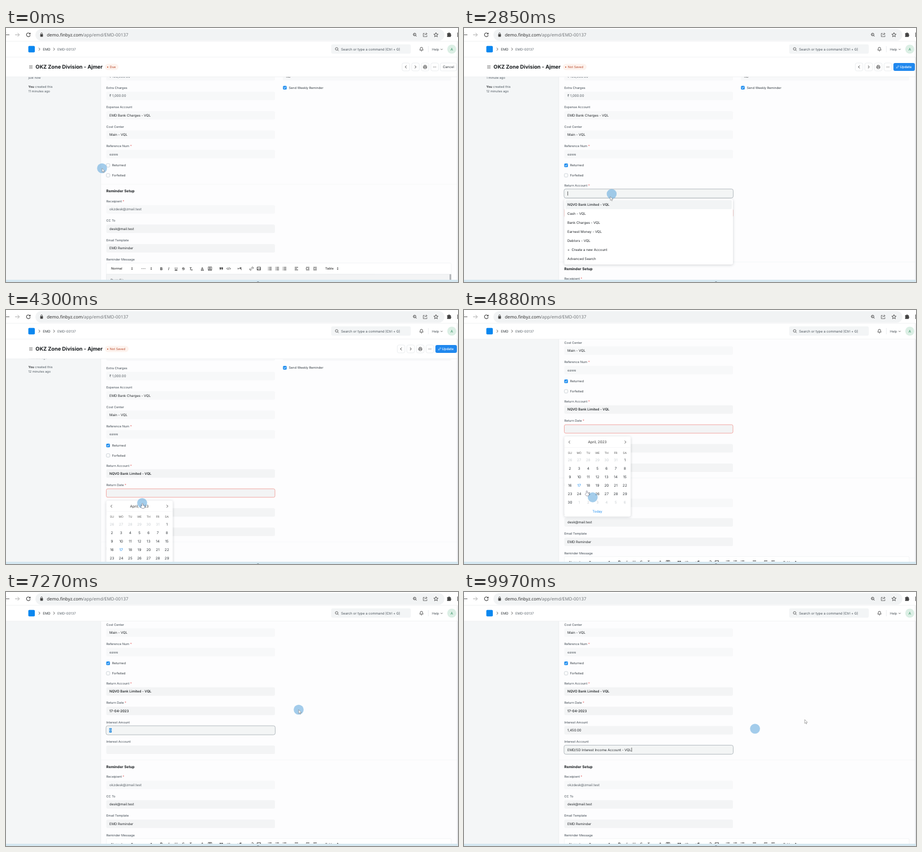
An HTML page with a canvas that plays this animation: 800x450 px, repeating every 10 s.

```html
<!DOCTYPE html>
<html lang="en">
<head>
<meta charset="utf-8">
<title>Deposit form</title>
<style>
html, body { margin: 0; width: 100%; height: 100%; overflow: hidden; background: #fff; }
canvas { display: block; width: 800px; height: 450px; }
</style>
</head>
<body>
<canvas id="stage"></canvas>
<script>
const LOOP = 10000, SANS = 'Inter, sans-serif';
const canvas = document.getElementById('stage'), c = canvas.getContext('2d');
const ratio = window.devicePixelRatio || 1;
canvas.width = 800 * ratio;
canvas.height = 450 * ratio;
// Unhinted advances keep small text at its true width
c.textRendering = 'geometricPrecision';

// Pointer path: time, x, y
const path = [
  [0, 170, 248.5], [700, 181, 244], [1250, 181, 244], [1790, 240, 229.3], [1850, 256, 246],
  [2200, 262, 293], [2750, 262, 293], [3050, 250, 314], [3270, 250, 314], [3600, 213, 330],
  [3850, 213, 330], [4240, 241, 342], [4300, 241, 344], [4700, 241, 344], [5000, 204, 310],
  [5230, 204, 310], [5550, 465, 261.5], [5610, 475, 259], [6400, 420, 246], [6750, 400, 246],
  [7180, 518, 208.5], [8500, 518, 208.5], [8780, 380, 279], [9150, 380, 279], [9450, 350, 299],
  [9690, 350, 299], [9910, 515, 242.3], [9970, 603, 226], [LOOP, 603, 226]
];
const HALO_LAG = 60;
const between = (t, a, b) => t >= a && t < b;
const ease = (t, a, b) => {
  const u = Math.min(1, Math.max(0, (t - a) / (b - a)));
  return u * u * (3 - 2 * u);
};

function pointerAt(t) {
  const i = Math.max(1, path.findIndex(p => p[0] >= t));
  const [t0, x0, y0] = path[i - 1], [t1, x1, y1] = path[i], u = ease(t, t0, t1);
  return [x0 + (x1 - x0) * u, y0 + (y1 - y0) * u];
}

// Drawing helpers; text is placed by its vertical centre
function text(s, x, y, size = 6.04, color = '#262a2e', weight = 400, align = 'left', family = SANS) {
  c.font = `${weight} ${size}px ${family}`;
  c.fillStyle = color;
  c.textAlign = align;
  c.fillText(s, x, y + size * 0.36);
  return c.measureText(s).width;
}
function box(x, y, w, h, r, fill, line, lineWidth = 0.7) {
  c.beginPath();
  c.roundRect(x, y, w, h, r);
  if (fill) { c.fillStyle = fill; c.fill(); }
  if (line) { c.strokeStyle = line; c.lineWidth = lineWidth; c.stroke(); }
}
function disc(x, y, r, fill) {
  box(x - r, y - r, 2 * r, 2 * r, r, fill);
}
function icon(d, x, y, color = '#444', width = 0.9, fill) {
  const p = new Path2D(d);
  c.save();
  c.translate(x, y);
  if (fill) { c.fillStyle = fill; c.fill(p); }
  c.strokeStyle = color;
  c.lineWidth = width;
  c.stroke(p);
  c.restore();
}
function panel(x, y, w, h) {
  c.save();
  c.shadowColor = 'rgba(30,40,50,.2)';
  c.shadowBlur = 5 * ratio;
  c.shadowOffsetY = ratio;
  box(x, y, w, h, 3, '#fff');
  c.restore();
}
const RIGHT = 'M-1.2 -2.3L1.2 0L-1.2 2.3', LEFT = 'M1.2 -2.3L-1.2 0L1.2 2.3', DOWN = 'M-1.7 -.8L0 .9L1.7 -.8';
const UPDOWN = 'M-1.2 -.8L0 -2.2L1.2 -.8ZM-1.2 .8L0 2.2L1.2 .8Z';
const LENS = 'M2 -.5A2.3 2.3 0 1 1 -2.6 -.5A2.3 2.3 0 1 1 2 -.5M1.4 1.2L3.2 3';
const LINES = 'M-3 -2.2H3M-3 0H3M-3 2.2H3';

function label(s, y, required) {
  const w = text(s, 177.5, y, 5.55, '#414b54');
  if (required) text('*', 179 + w, y, 5.55, '#e24c4c');
}
function field(y, value, o = {}) {
  const { x = 177.5, w = 298.5, focus, invalid, readOnly, bold, color } = o;
  if (focus) box(x - 0.5, y - 8, w + 1, 16, 3.2, '#f3f5f5', '#b4bbc0', 1);
  else box(x, y - 7.5, w, 15, 2.5, readOnly ? '#f7f8f9' : '#f3f4f5', invalid && '#f0958e', 0.8);
  const ink = color || (bold ? '#15191c' : '#262a2e');
  const width = text(value, x + 5.5, y, 6.04, ink, bold ? 500 : 400);
  if (focus && !o.selected) box(x + 5.9 + width, y - 3.6, 0.7, 7.2, 0, '#222');
}
function check(x, y, on, s) {
  if (on) {
    box(x - 3.3, y - 3.3, 6.6, 6.6, 1.6, '#2490ef');
    icon('M-1.7 0L-.5 1.3L1.8 -1.3', x, y, '#fff', 1);
  } else box(x - 3, y - 3, 6, 6, 1.5, '#fff', '#b8c0c7', 0.7);
  text(s, x + 7, y, 5.6, '#363e45');
}
function suggestions(y, items) {
  panel(177.5, y, 298.5, items.length * 16 + 4);
  items.forEach((s, i) => {
    if (!i) box(179.5, y + 2, 294.5, 16, 2, '#f2f4f5');
    text(s, 183, y + 10 + i * 16, 6.04, '#262a2e', i ? 400 : 500);
  });
}

function calendar(y) {
  panel(177.5, y, 117.5, 142);
  icon(LEFT, 186.5, y + 10);
  icon(RIGHT, 285.5, y + 10);
  text('April, 2023', 236, y + 10, 6.3, '#333', 400, 'center');
  box(178, y + 19, 116.5, 0.6, 0, '#edf0f2');
  ['SU', 'MO', 'TU', 'WE', 'TH', 'FR', 'SA'].forEach((s, i) =>
    text(s, 187.5 + i * 16.2, y + 29, 5, '#555', 400, 'center'));
  for (let i = 0; i < 42; i++) {
    const day = i < 6 ? i + 26 : i > 35 ? i - 35 : i - 5, other = i < 6 || i > 35, today = i === 22;
    text(day, 187.5 + i % 7 * 16.2, y + 42 + Math.floor(i / 7) * 15, 6.3,
      other ? '#c8cdd1' : today ? '#2490ef' : '#30363b', today ? 500 : 400, 'center');
  }
  text('Today', 236, y + 133, 6, '#2490ef', 400, 'center');
}

function editor(y) {
  box(177.5, y - 10, 610.5, 20, 2, '#fff', '#eceff1');
  box(177.5, y + 10, 610.5, 90, 0, '#f3f4f5', '#e6e9eb');
  box(785, y + 10, 3, 40, 0, '#b5b8bb');
  text('Dear Sir,', 185, y + 20.5);
  text('Normal', 186, y, 5.7, '#333', 500);
  text('---', 239, y, 6, '#333', 500);
  text('Table', 565, y, 5.7, '#333', 500);
  [223, 257, 587].forEach(x => icon(UPDOWN, x, y, '#333', 0.2, '#333'));
  const glyph = (s, x, style = 500) => text(s, x, y, 6.8, '#333', style, 'center');
  glyph('B', 275, 700);
  glyph('I', 288, 'italic 500');
  glyph('U', 301);
  glyph('S', 314);
  glyph('T', 326.5, 'italic 500');
  glyph('A', 347.5);
  glyph('A', 361);
  glyph('¶', 415);
  icon('M-2.8 -2H-.5V.3L-1.7 2.2H-2.4L-1.9 .3H-2.8ZM.5 -2H2.8V.3L1.6 2.2H.9L1.4 .3H.5Z', 381, y, '#333', 0.2, '#333');
  icon('M-1 -1.3L.8 0L-1 1.3Z', 411.5, y, '#333', 0.2, '#333');
  icon('M298.5 3.2H303.5M311.5 0H316.5M327.5 1L330 3.4M330 1L327.5 3.4M345 3.2H350M358 -3H364V3H358Z' +
    'M392.6 -1.7L390.6 0L392.6 1.7M395.6 -1.7L397.6 0L395.6 1.7M394.7 -2L393.5 2', 0, y, '#333', 0.8);
  icon('M-.8 .8L.8 -.8M0 -1.6L1 -2.6A1.5 1.5 0 0 1 3 -.6L1.8 .6M0 1.6L-1 2.6A1.5 1.5 0 0 1 -3 .6L-1.8 -.6', 434.5, y, '#333', 0.9);
  icon('M-3 -2.6H3V2.6H-3ZM-2.8 2L-.8 0L.5 1L1.6 -.2L3 1.6', 447.5, y, '#333', 0.9);
  [467, 480, 493, 514, 534, 547].forEach((x, i) => {
    icon(i < 3 ? 'M-1.4 -2.3H3.2M-1.4 0H3.2M-1.4 2.3H3.2' : i < 4 ? 'M-3 -2.3H3M-3 0H1M-3 2.3H3' : 'M-3 -2.3H3M0 0H3M-3 2.3H3', x, y, '#333', 0.9);
    if (i < 3) icon('M-3.3 -2.3H-2.3M-3.3 0H-2.3M-3.3 2.3H-2.3', x, y, '#333', 0.9);
  });
  icon('M-3 -1L-1.6 0L-3 1Z', 534, y, '#333', 0.3, '#333');
  icon('M-1.6 -1L-3 0L-1.6 1Z', 547, y, '#333', 0.3, '#333');
}

function page(t) {
  const open = t >= 1210, grow = open ? 137.5 : 0;
  const scroll = 117 * ease(t, 4265, 4620);
  const grey = { readOnly: true, color: '#565e65' }, plain = { readOnly: true };
  c.save();
  c.beginPath();
  c.rect(0, 52, 800, 394);
  c.clip();
  c.fillStyle = '#f4f6f7';
  c.fillRect(0, 52, 168, 394);
  c.fillStyle = '#fdfdfe';
  c.fillRect(168, 52, 631, 394);
  c.fillStyle = '#e9ecee';
  c.fillRect(167.5, 52, 0.7, 394);
  c.translate(0, -scroll);

  text(open ? '1 minute ago' : 'just now', 39.5, 88, 5.6, '#505a62');
  const you = text('You', 39.5, 104, 5.6, '#262a2e', 600);
  text(' created this', 39.5 + you, 104, 5.6, '#505a62');
  text(open ? '12 minutes ago' : '11 minutes ago', 39.5, 112, 5.6, '#505a62');

  field(85.7, '₹ 100,000.00', grey);
  field(85.7, 'No', { ...plain, x: 490, w: 298 });
  check(493.5, 105.7, true, 'Send Weekly Reminder');
  label('Extra Charges', 106);
  field(120.3, '₹ 1,000.00', grey);
  label('Expense Account', 140.5);
  field(154.7, 'EMD Bank Charges - VQL', plain);
  label('Cost Center', 175);
  field(189, 'Main - VQL', plain);
  label('Reference Num', 209.5, true);
  field(223.5, 'eawe', grey);
  check(180.7, 243.3, t >= 1000, 'Returned');
  check(180.7, 261, false, 'Forfeited');

  const bank = 'NQVO Bank Limited - VQL', income = 'EMD/SD Interest Income Account - VQL';
  if (open) {
    const hasBank = t >= 3280, focusBank = between(t, 2260, 3810);
    label('Return Account', 279, true);
    field(293.2, hasBank ? bank : '', { bold: true, focus: focusBank, invalid: !hasBank });
    label('Return Date', 313.3, true);
    field(327.7, t >= 5210 ? '17-04-2023' : '', { bold: true, invalid: t < 5210 });

    const typing = between(t, 6650, 8600), digits = Math.floor((t - 7240) / 260);
    const selected = typing && digits < 1;
    const amount = t < 6650 ? '0.00' : t >= 8600 ? '1,450.00' : selected ? '' : '1450'.slice(0, digits);
    label('Interest Amount', 347.7);
    field(362, amount, { focus: typing, selected });
    if (selected) {
      box(182.7, 358.2, 4.4, 7.8, 0, '#2f8fdd');
      text('0', 183, 362, 6.04, '#fff');
    }
    label('Interest Account', 382);
    field(396.4, t >= 9700 ? income : '', { focus: t >= 8600 });
  }

  c.fillStyle = '#f3f5f6';
  c.fillRect(168, 276.5 + grow, 631, 0.7);
  text('Reminder Setup', 177.5, 289 + grow, 6.45, '#15191c', 700);
  label('Receipient', 307 + grow, true);
  field(321.3 + grow, 'okzdesk@zmail.test', grey);
  label('CC To', 341.5 + grow);
  field(355.8 + grow, 'desk@mail.test');
  label('Email Template', 376 + grow);
  field(390.2 + grow, 'EMD Reminder');
  label('Reminder Message', 410.3 + grow);
  editor(426.3 + grow);

  if (between(t, 2430, 3280))
    suggestions(303, [bank, 'Cash - VQL', 'Bank Charges - VQL', 'Earnest Money - VQL', 'Debtors - VQL', '+  Create a new Account', 'Advanced Search']);
  if (between(t, 3850, 5210)) calendar(341);
  if (between(t, 9000, 9700))
    suggestions(406.5, [income, 'Interest Income - VQL', 'Other Income - VQL', '+  Create a new Account', 'Advanced Search']);
  c.restore();
}

function header(t) {
  const saved = t < 1210, shift = saved ? 0 : -8.5;
  const y = 69 - 36 * ease(t, 4330, 4580);
  if (y < 34) return;
  const button = (x, w) => box(x, y - 7, w, 14, 3, '#fff', '#e3e7ea');
  c.fillStyle = '#fff';
  c.fillRect(0, y - 18, 799, 35.5);
  c.fillStyle = '#e9ecef';
  c.fillRect(0, y + 17, 799, 0.6);
  icon(LINES, 44, y, '#666', 0.8);
  text('OKZ Zone Division - Ajmer', 52.3, y, 9.2, '#15191c', 700);
  box(175, y - 5.5, saved ? 24 : 42, 11, 5.5, '#fdf3ee');
  disc(180, y + 0.3, 1.1, '#cb5a37');
  text(saved ? 'Due' : 'Not Saved', 183.7, y + 0.3, 5.6, '#b8492b');
  [701, 718, 735, 752].forEach(x => button(x + shift, 13.5));
  icon(LEFT, 707.7 + shift, y, '#333');
  icon(RIGHT, 724.7 + shift, y, '#333');
  icon('M-1.7 -1V-3H1.7V-1M-1.7 1.6H-3V-1H3V1.6H1.7M-1.7 .5H1.7V3H-1.7Z', 741.7 + shift, y, '#333', 0.7);
  [-2, 0, 2].forEach(dx => disc(758.7 + shift + dx, y, 0.55, '#333'));
  if (saved) {
    button(768.5, 29);
    text('Cancel', 783, y, 6, '#30363b', 400, 'center');
  } else {
    box(760, y - 7, 38, 14, 3, '#2088ee');
    icon('M-2 2L-1.6 .4L1.2 -2.4L2.4 -1.2L-.4 1.6Z', 767.5, y, '#fff', 0.6);
    text('Update', 771.5, y, 6, '#fff', 500);
  }
}

function chrome() {
  c.fillStyle = '#fff';
  c.fillRect(0, 0, 800, 52);
  box(52, 2, 724, 20.5, 10, '#f1f3f4');
  icon('M6 0H-4M0 -3.5L-3.5 0L0 3.5', 0, 12, '#555', 1);
  icon('M-4 0H3.5M.5 -3.2L3.7 0L.5 3.2', 20, 12, '#aaa', 1);
  icon('M2.8 -1.8A3.3 3.3 0 1 0 3.3 .6M3.4 -3.6V-1.2H1', 39.5, 12, '#444', 1.1);
  icon('M-1.4 -.6V-2A1.4 1.4 0 0 1 1.4 -2V-.6', 63, 12, '#444', 0.8);
  box(60.6, 11, 4.8, 4.4, 0.6, '#444');
  const url = 'Open Sans, sans-serif';
  const w = text('demo.finbyz.com', 72.3, 12, 7.85, '#222', 400, 'left', url);
  text('/app/emd/EMD-00137', 72.3 + w, 12, 7.85, '#686c70', 400, 'left', url);
  icon(LENS, 723.5, 12, '#444', 1);
  icon('M-1.7 -.5H.3', 723.5, 12, '#444', 0.8);
  icon('M-1 -2.5H-3.5V3.3H3V1M-1.5 1Q-1 -1.7 2.5 -1.7M1 -3.6L3.4 -1.7L1 .2', 742, 12, '#555', 0.8);
  icon('M0 -3.8L1.1 -1.2L3.9 -1L1.7 .8L2.4 3.6L0 2L-2.4 3.6L-1.7 .8L-3.9 -1L-1.1 -1.2Z', 761, 12, '#444', 0.9);
  icon('M-3 -2H-1A1.2 1.2 0 0 1 1.4 -2H3V.2A1.2 1.2 0 0 1 3 2.5V4H-3V2A1.1 1.1 0 0 0 -3 0Z', 784, 11.5, '#444', 0.6, '#444');
  box(799, 8, 1, 8, 0, '#555');
  c.fillStyle = '#eceef0';
  c.fillRect(0, 23.3, 800, 0.7);
  c.fillRect(0, 51.2, 800, 0.7);

  box(39.5, 31.8, 11.5, 11.5, 1.8, '#0b87f0');
  icon(RIGHT, 59, 37.5, '#333', 0.8);
  text('EMD', 65.3, 37.5, 6, '#30363b');
  icon(RIGHT, 85, 37.5, '#333', 0.8);
  text('EMD-00137', 91, 37.5, 5.9, '#5a636b');
  box(575.5, 29, 141, 16.5, 3, '#f3f5f6');
  icon(LENS, 585.5, 37.5, '#444', 0.8);
  text('Search or type a command (Ctrl + G)', 593, 37.5, 6, '#4a535b');
  icon('M-3 1.8Q-2.1 .8 -2.1 -1A2.1 2.1 0 0 1 2.1 -1Q2.1 .8 3 1.8ZM-1 3A1.1 1.1 0 0 0 1 3', 735.3, 37.3, '#333', 0.8);
  c.fillStyle = '#dfe3e6';
  c.fillRect(747, 32, 0.6, 11);
  text('Help', 754, 37.5, 5.7, '#444c53');
  icon(DOWN, 771, 37.7, '#444', 0.8);
  disc(789, 37.5, 8, '#dcefe5');
  text('A', 789, 37.5, 6.2, '#479d71', 500, 'center');

  c.fillStyle = '#e1e3e6';
  c.fillRect(798.4, 24, 1, 422);
  c.fillStyle = '#d5e7f0';
  c.fillRect(0, 446, 800, 4);
  box(444.5, 449.2, 3, 0.8, 0, '#6b7a86');
}

function pointer(t) {
  const [hx, hy] = pointerAt(Math.max(0, t - HALO_LAG)), [x, y] = pointerAt(t);
  disc(hx, hy, 8.8, 'rgba(104,171,221,.6)');
  const beam = [[2150, 2450], [3560, 4000], [6400, 6900], [8650, 9200]].some(([a, b]) => between(t, a, b));
  if (beam) icon('M-1.6 -3.4H1.6M0 -3.4V3.4M-1.6 3.4H1.6', x, y, '#222', 0.8);
  else if (between(t, 4150, 5300))
    icon('M-1 3V-1Q0 -2 1 -1V2L4 2.8V5.5L3 7.5H-.8L-3 4.5L-2.3 3.6Z', x + 0.5, y, '#667', 0.6, '#fff');
  else icon('M0 0V6.8L1.6 5.4L2.7 7.8L3.7 7.3L2.7 5H4.9Z', x, y, '#777', 0.6, '#fff');
}

function draw(now) {
  const t = now % LOOP;
  c.setTransform(ratio, 0, 0, ratio, 0, 0);
  page(t);
  header(t);
  chrome();
  pointer(t);
}
const start = performance.now();
function tick() {
  draw(performance.now() - start);
  requestAnimationFrame(tick);
}
tick();
</script>
</body>
</html>
```
